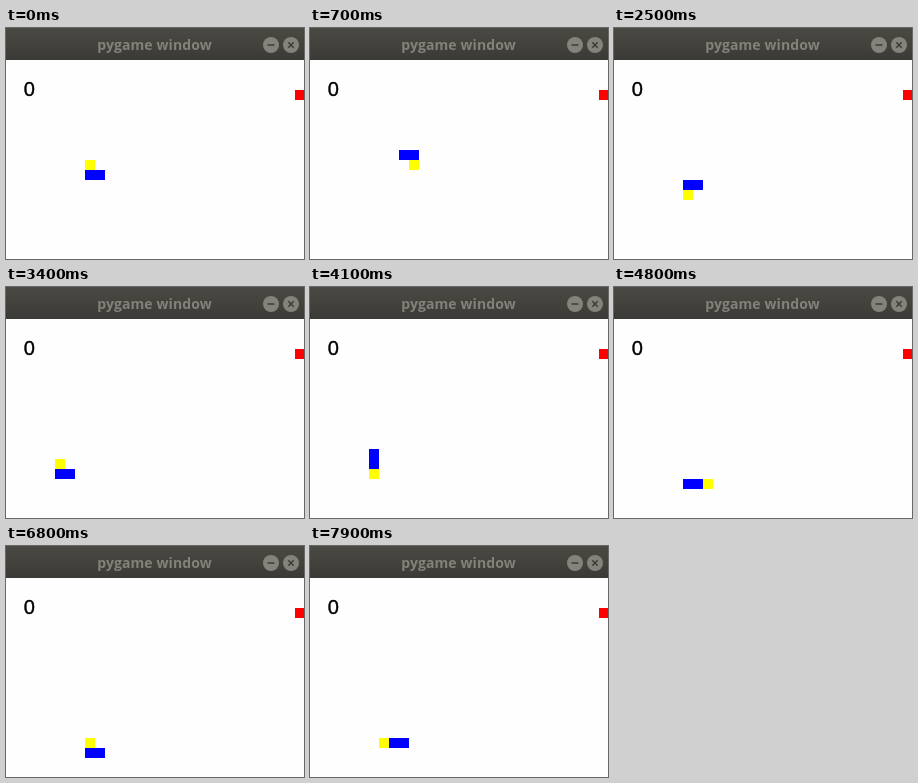
These frames come from a looping animation (298x231 px, 8000 ms). An HTML page:

```html
<!DOCTYPE html>
<html lang="en">
<head>
<meta charset="utf-8">
<title>pygame window</title>
<style>
  html, body { margin: 0; width: 100%; height: 100%; overflow: hidden; background: #fefefe; }
  svg { display: block; width: 298px; height: 231px; }
  .title { font: bold 14px "Open Sans", "Noto Sans", sans-serif; letter-spacing: .1px; fill: #83817a; }
  .score { font: 20px "Liberation Sans", Arial, sans-serif; stroke: #000; stroke-width: .4px; }
  .button circle { fill: #85827b; }
  .button path { fill: none; stroke: #3c3b37; stroke-width: 1.5; }
  .cells { shape-rendering: crispEdges; }
</style>
</head>
<body>
<svg viewBox="0 0 298 231">
  <defs>
    <linearGradient id="bar" x2="0" y2="1">
      <stop offset="0" stop-color="#4a4943"/>
      <stop offset="1" stop-color="#3b3a36"/>
    </linearGradient>
  </defs>
  <rect width="298" height="231" fill="#fefefe"/>
  <rect width="298" height="32" fill="url(#bar)"/>
  <text class="title" x="148.5" y="22" text-anchor="middle">pygame window</text>
  <g class="button" transform="translate(265 17)">
    <circle r="8"/>
    <path d="M-3.5 0h7"/>
  </g>
  <g class="button" transform="translate(285 17)">
    <circle r="8"/>
    <path d="M-2.7-2.7l5.4 5.4m0-5.4l-5.4 5.4"/>
  </g>
  <text class="score" x="17.8" y="68">0</text>
  <g class="cells">
    <rect x="289" y="62" width="10" height="10" fill="#f00"/>
    <g id="snake">
      <rect width="10" height="10" fill="#ff0"/>
      <rect width="10" height="10" fill="#00f"/>
      <rect width="10" height="10" fill="#00f"/>
    </g>
  </g>
</svg>
<script>
  const LOOP = 8000;
  const CELL = 10;
  const START = [[79, 132], [79, 142], [89, 142]];
  const TURNS = { U: [0, -1], D: [0, 1], L: [-1, 0], R: [1, 0] };

  // Time in ms, then the moves made at that moment.
  const steps = `
    100U 300R 500R 600D 800R 1200UL 1400L 1600L 1800D 1900D 2100D
    2300L 2500D 2700L 2800D 3200DL 3400U 3700UR 3900D 4100D
    4300D 4500R 4700R 4800R 5000D 5200R 5400D 5700DL 5900L
    6100U 6300R 6400U 6600L 6800U 7200UR 7500D 7700L 7900L`
    .trim().split(/\s+/)
    .map(s => ({ time: parseInt(s, 10), moves: s.replace(/\d/g, "") }));

  const parts = document.querySelectorAll("#snake rect");

  function snakeAt(time) {
    let body = START;
    for (const step of steps) {
      if (step.time > time) break;
      for (const move of step.moves) {
        const [x, y] = body[0];
        const [dx, dy] = TURNS[move];
        body = [[x + dx * CELL, y + dy * CELL], ...body.slice(0, -1)];
      }
    }
    return body;
  }

  function draw() {
    snakeAt(performance.now() % LOOP).forEach(([x, y], i) => {
      parts[i].setAttribute("x", x);
      parts[i].setAttribute("y", y);
    });
    requestAnimationFrame(draw);
  }
  draw();
</script>
</body>
</html>
```
